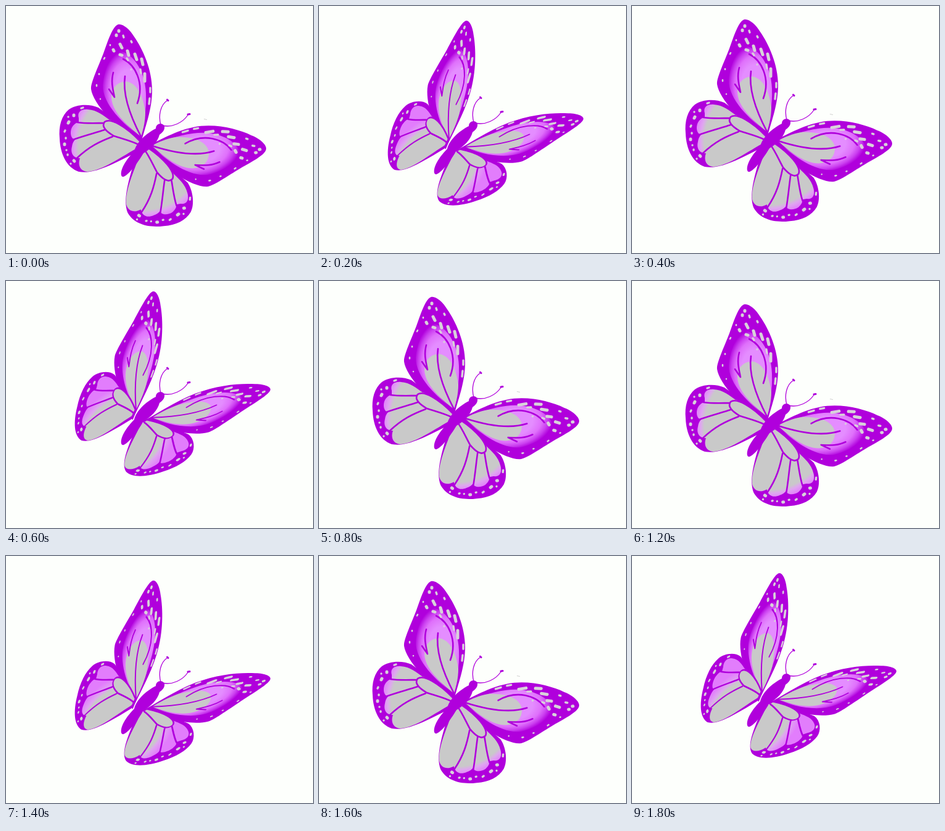
Animation of 498 by 401 pixels, one loop 2000 ms. Source, as an HTML page:

```html
<!DOCTYPE html>
<html lang="en">
<head>
<meta charset="utf-8">
<title>Butterfly</title>
<style>
html, body { margin: 0; width: 100%; height: 100%; overflow: hidden; background: #fdfffc; }
svg { display: block; width: 498px; height: 401px; }
.dark { fill: #b000dc; }
.cell { fill: var(--cell); }
.grey { fill: #c9c9c9; }
.spot { stroke: #d8d2da; stroke-linecap: round; fill: none; }
.vein { stroke: #b000dc; stroke-width: 2.6; stroke-linecap: round; stroke-linejoin: round; fill: none; }
.open { --cell: url(#cellOpen); animation: open .4s step-end infinite; }
.shut { --cell: url(#cellShut); animation: shut .4s step-end infinite; }
#fly { animation: drift 2s step-end infinite; }
@keyframes open { 0% { visibility: visible } 50%, 100% { visibility: hidden } }
@keyframes shut { 0% { visibility: hidden } 50%, 100% { visibility: visible } }
@keyframes drift {
  0%, 90%, 100% { transform: translateY(0) }
  10%, 40% { transform: translateY(-4px) }
  20% { transform: translateY(-8px) }
  30% { transform: translateY(-11px) }
  50% { transform: translateY(5px) }
  60% { transform: translateY(8px) }
  70% { transform: translateY(12px) }
  80% { transform: translateY(11px) }
}
</style>
</head>
<body>
<svg viewBox="0 0 498 401">
  <defs>
    <radialGradient id="cellOpen" gradientUnits="userSpaceOnUse" cx="215" cy="228" r="122">
      <stop offset=".8" stop-color="#c9c9c9"/>
      <stop offset=".85" stop-color="#dfa6f0"/>
      <stop offset=".93" stop-color="#e27dfc"/>
    </radialGradient>
    <radialGradient id="cellShut" gradientUnits="userSpaceOnUse" cx="185" cy="275" r="110">
      <stop offset=".66" stop-color="#c9c9c9"/>
      <stop offset=".71" stop-color="#dfa6f0"/>
      <stop offset=".84" stop-color="#e27dfc"/>
    </radialGradient>
    <radialGradient id="glow" gradientUnits="userSpaceOnUse" cx="0" cy="0" r="44"
        gradientTransform="translate(199 138) scale(1 1.55)">
      <stop offset=".5" stop-color="#e48dff"/>
      <stop offset=".72" stop-color="#df70fb"/>
      <stop offset=".86" stop-color="#cb40f0"/>
      <stop offset="1" stop-color="#b000dc"/>
    </radialGradient>

    <g id="hind">
      <path class="dark" d="M218 234C192 214 174 181 150 165C135 158 112 160 102 168C90 178 85 195 87 215C88 240 98 262 118 269C140 273 165 262 218 234Z"/>
      <path class="cell" d="M118 182C115 172 122 167 133 168C148 169 158 178 168 185C186 190 205 205 216 221L214 230C190 243 155 268 132 269C120 268 116 258 120 247C110 247 104 240 107 228Q108 221 112 217C105 216 103 205 107 197Q112 189 118 189Z"/>
      <path class="grey" d="M217 219C195 196 170 181 160 188C154 196 163 204 175 211C190 216 203 219 215 225Z"/>
      <path class="vein" d="M116 189C130 191 148 190 159 190M106 218C125 211 145 206 160 201M115 247C135 228 152 220 173 212M217 219C195 196 170 181 160 188C154 196 163 204 175 211C190 216 203 219 215 225"/>
      <g class="spot" stroke-width="5">
        <path d="M110 177l0 1M102 188l-1 2M95 224l0 1M110 251l1 1"/>
        <path stroke-width="3.4" d="M96 202l-1 2M97 214l0 1M100 241l0 1M98 234l0 0M125 165l-3 1M101 180l0 0M105 256l0 0"/>
      </g>
    </g>

    <g id="fore">
      <path class="dark" d="M218 228C222 205 236 175 237 140C238 105 222 70 208 50C200 36 186 26 180 31C172 36 166 55 158 77C150 98 137 125 138 135C141 158 178 198 218 228Z"/>
      <path fill="url(#glow)" d="M217 213C192 192 156 160 157 128C160 98 172 74 187 74C204 76 226 104 227 142C228 170 224 190 217 213Z"/>
      <path class="grey" d="M219 212C194 193 171 170 171 147C172 129 185 121 198 123C215 128 223 150 226 172C226 187 223 199 219 212Z"/>
      <path class="vein" d="M193 114C189 142 200 176 219 212M190 86C210 96 225 125 213 158M174 108C170 122 173 134 176 148L167 135"/>
      <g class="spot">
        <path stroke-width="5" d="M183 40l0 1M179 47l0 1M185 62l3 6M197 73l2 7M209 78l3 9M220 86l2 9M225 110l0 12M185 79l3 1M174 71l1 2"/>
        <path stroke-width="3.4" d="M190 48l1 3M203 57l1 2M196 85l2 3M218 103l1 6M234 133l0 7M233 150l-1 9M203 103l0 0"/>
        <path stroke-width="2.6" d="M169 63l0 1M160 84l-1 2M151 110l0 1M147 128l0 2M153 151l0 0"/>
      </g>
    </g>

    <g id="wing"><use href="#fore"/><use href="#hind"/></g>
    <use id="mirror" href="#wing" transform="matrix(-.1704 -.9853 -.9853 .1704 482.6 406.3)"/>
  </defs>

  <g id="fly">
    <g class="open">
      <use href="#wing"/>
      <use href="#mirror"/>
      <path d="M321 183.5l5 1" stroke="#cfcfcf" fill="none"/>
    </g>
    <g class="shut">
      <use href="#fore" transform="matrix(.704 .087 -.294 1.038 119 -19)"/>
      <use href="#hind" transform="matrix(.73 0 -.29 1.027 114.5 -6.3)"/>
      <use href="#mirror" transform="matrix(1.036 -.264 -.015 .7095 -4.8 134.4)"/>
    </g>
    <path class="dark" d="M187 275C185 263 198 246 208 236C211 222 227 207 243 199C243 191 253 188 257 195C258 202 253 206 249 209C246 221 235 232 223 239C212 257 199 274 191 277Q188 278 187 275Z"/>
    <path class="vein" style="stroke-width:1.3" d="M251 193C247 178 250 161 262 153M254 194C270 198 287 189 295 177"/>
    <path class="vein" style="stroke-width:3" d="M261.500 152l1.500 1.500M295 176l3-.5"/>
  </g>
</svg>
</body>
</html>
```
